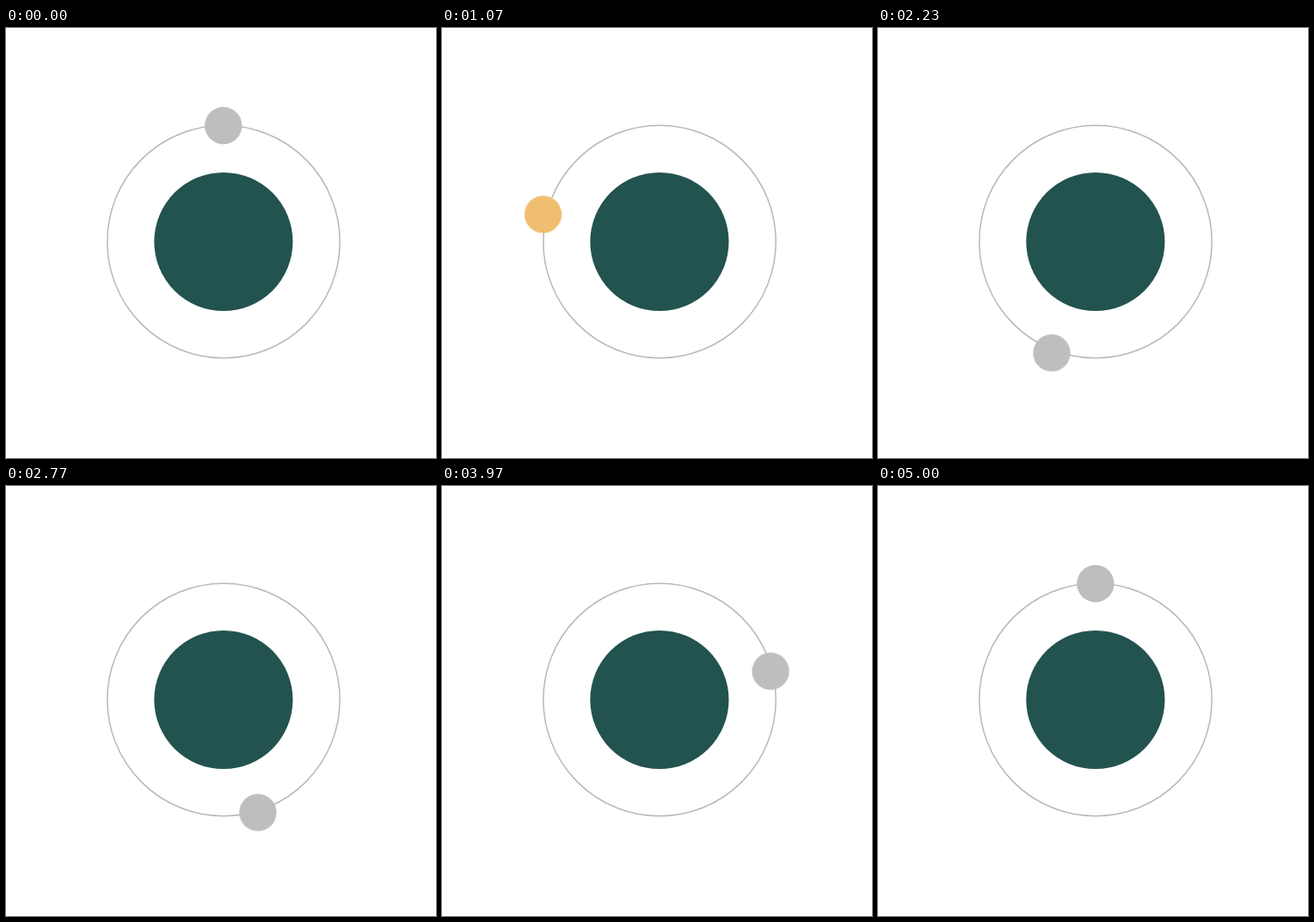
Recreate the animation shown at these times as an HTML page. Size 500 by 500 pixels, loop 5030 ms.

```html
<!DOCTYPE html>
<html lang="en">
<head>
<meta charset="utf-8">
<title>Orbit</title>
<style>
  html, body {
    margin: 0;
    width: 100%;
    height: 100%;
    overflow: hidden;
    background: #fff;
  }
  svg { display: block; width: 100vw; height: 100vh; }
  .ring { fill: none; stroke: #b8b8b8; stroke-width: 1.5; }
  .planet { fill: #22534f; }
  /* The pivot sits slightly off the ring's centre. */
  .moon {
    fill: #bebebe;
    transform-origin: 250px 250px;
    animation: orbit 5030ms linear infinite, glow 5030ms step-end infinite;
  }
  /* One turn takes 5000 ms, then a short rest before the loop restarts. */
  @keyframes orbit {
    from { transform: rotate(0deg); }
    99.404%, to { transform: rotate(-360deg); }
  }
  @keyframes glow {
    0% { fill: #bebebe; }
    19.88% { fill: #f0be70; }
    39.76%, 100% { fill: #bebebe; }
  }
</style>
</head>
<body>
<svg viewBox="0 0 500 500">
  <circle class="ring" cx="253" cy="248.5" r="135.2"/>
  <circle class="planet" cx="252.9" cy="248.5" r="80.6"/>
  <circle class="moon" cx="252.9" cy="113.5" r="21.7"/>
</svg>
</body>
</html>
```
